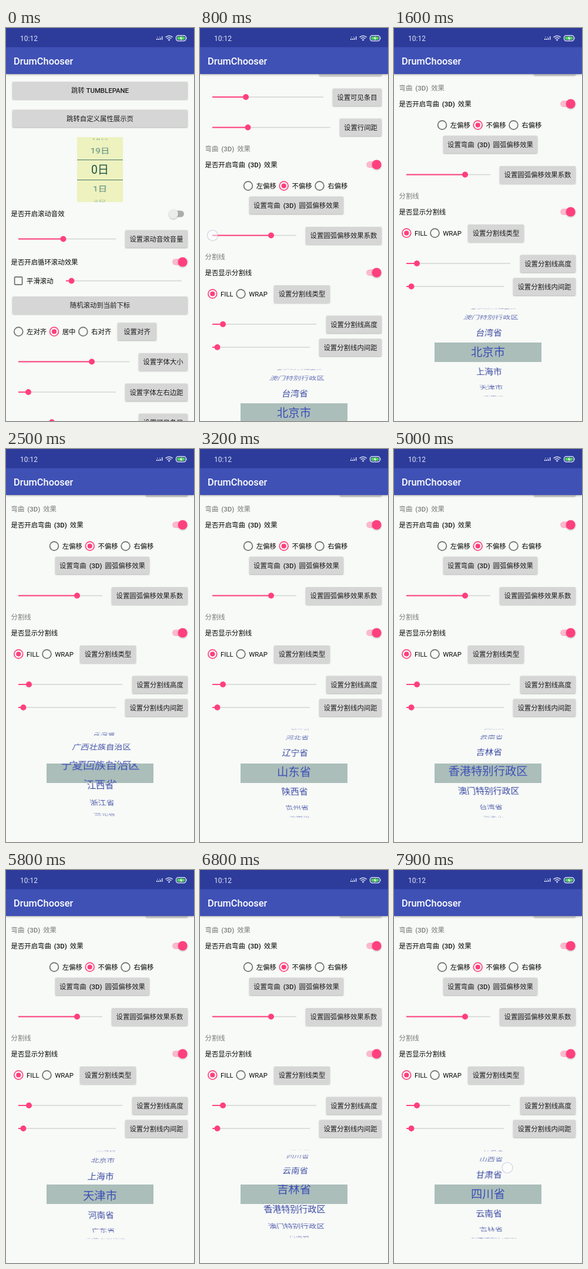
These frames come from a looping animation (320 px wide and 666 px high, 8 s). An HTML page:

```html
<!DOCTYPE html>
<html lang="zh-CN">
<head>
<meta charset="utf-8">
<title>DrumChooser</title>
<style>
html, body { margin: 0; width: 100%; height: 100%; overflow: hidden; }
body { font-family: Roboto, "Noto Sans CJK SC", "Noto Sans CJK", sans-serif; background: #f8faf7; }
#stage { position: relative; width: 320px; height: 666px; overflow: hidden; background: #f8faf7; }
#page { position: absolute; left: 0; top: 0; width: 320px; height: 1320px; }
#page svg { position: absolute; left: 0; top: 0; }
#bar { position: absolute; left: 0; top: 0; width: 320px; height: 78px; background: #3f51b5;
  box-shadow: 0 1px 3px rgba(0,0,0,.35); }
#bar svg { position: absolute; left: 0; top: 0; }
#touch { position: absolute; left: -9.5px; top: -9.5px; width: 17px; height: 17px; border-radius: 50%;
  border: 1px solid rgba(150,160,200,.5); background: rgba(255,255,255,.45); }
.wheel, .layer { position: absolute; }
.layer { left: 0; top: 0; width: 100%; height: 100%; }
.item { position: absolute; left: 0; width: 100%; height: 30px; line-height: 30px;
  text-align: center; white-space: nowrap; }
</style>
</head>
<body>
<div id="stage">
  <div id="page"></div>
  <div id="bar">
    <svg width="320" height="78" font-family="inherit" fill="#fff">
      <rect width="320" height="32.5" fill="#2d3c9b"/>
      <text x="24" y="22" font-size="12" fill="#dfe3f5">10:12</text>
      <text x="13" y="62.3" font-size="16.4" font-weight="500">DrumChooser</text>
      <g fill="#dfe3f5">
        <path d="M256 18h2v2h-2zM259 18h2v2h-2zM262 17h1.6v3H262zM265 14h1.4v6H265zM257 15h1.4v1H257zM261 15h1.4v1H261z"/>
        <path d="M271.6 15.6q6-4.8 12 0M273.8 18q3.8-3 7.6 0" fill="none" stroke="#dfe3f5" stroke-width="1.5"/>
        <path d="M275.6 19.8q2-1.6 4 0l-2 2.2z"/>
      </g>
      <rect x="289.5" y="12.6" width="16.8" height="9.2" rx="3.8" fill="none" stroke="#eef1fa" stroke-width="1.3"/>
      <rect x="291.2" y="14.4" width="13.2" height="5.6" rx="2" fill="#4fce5d"/>
      <path d="M307.5 15.2q1.6 2 0 4z" fill="#eef1fa"/>
      <path d="M298.8 13.6l-3 4.4h2.2l-.8 3.4 3.2-4.5h-2.3z"/>
    </svg>
  </div>
  <div id="touch"></div>
</div>
<script>
const PINK = '#ff3f7f', GREY = '#6e6e6e', INK = '#080808', SOFT = '#7b7b7b', RAIL = '#d2d4d2';
const page = document.getElementById('page');
const touch = document.getElementById('touch');

// Static widgets, each placed by its vertical centre
const label = (x, y, s, fill = INK, extra = '') =>
  `<text x="${x}" y="${y + 4.3}" fill="${fill}" ${extra}>${s}</text>`;

const button = (x1, x2, y, s) =>
  `<rect x="${x1}" y="${y - 15}" width="${x2 - x1}" height="29.6" rx="1.6" fill="#d5d6d5" filter="url(#drop)"/>` +
  label((x1 + x2) / 2, y, s, '#1c1c1c', 'text-anchor="middle"');

const slider = (x1, x2, thumb, y) =>
  `<path d="M${x1} ${y}H${x2}" stroke="${RAIL}" stroke-width="1.7"/>` +
  `<path d="M${x1} ${y}H${thumb}" stroke="${PINK}" stroke-width="1.9"/>` +
  `<circle cx="${thumb}" cy="${y}" r="5" fill="${PINK}"/>`;

const toggle = (y, on) =>
  `<rect x="283" y="${y - 5.6}" width="20" height="11.2" rx="5.6" fill="${on ? '#fbb9cf' : '#adaeac'}"/>` +
  `<circle cx="${on ? 300.7 : 285}" cy="${y}" r="8" fill="${on ? PINK : '#ececec'}" filter="url(#drop)"/>`;

const radio = (x, y, s, on) =>
  `<circle cx="${x}" cy="${y}" r="7.4" fill="none" stroke="${on ? PINK : GREY}" stroke-width="1.7"/>` +
  (on ? `<circle cx="${x}" cy="${y}" r="4.1" fill="${PINK}"/>` : '') + label(x + 13.7, y, s);

const bold = s => `<tspan font-weight="500">${s}</tspan>`;
const cube = rest => `<tspan dx="5" font-weight="500">(3D)</tspan><tspan dx="5">${rest}</tspan>`;

page.innerHTML = `<svg width="320" height="1320" font-family="inherit" font-size="11.4">
<defs><filter id="drop" x="-20%" y="-20%" width="140%" height="160%">
<feDropShadow dx="0" dy="1" stdDeviation=".8" flood-opacity=".3"/></filter></defs>` + [
  button(11, 309, 106, '跳转 ' + bold('TUMBLEPANE')),
  button(11, 309, 153.5, '跳转自定义属性展示页'),
  label(8.5, 315, '是否开启滚动音效'), toggle(315, false),
  slider(21, 187, 97.5, 357.5), button(203, 309, 357.5, '设置滚动音效音量'),
  label(8.5, 397, '是否开启循环滚动效果'), toggle(396.5, true),
  `<rect x="14.6" y="421.8" width="13" height="13" rx="1" fill="none" stroke="${GREY}" stroke-width="1.7"/>`,
  label(35, 428.5, '平滑滚动'), slider(102, 299, 111.5, 428.5),
  button(11, 309, 470, '随机滚动到当前下标'),
  radio(21.3, 514.5, '左对齐'), radio(82, 514.5, '居中', true), radio(131.3, 514.5, '右对齐'),
  button(190, 256, 514.5, '设置对齐'),
  slider(21, 210, 146, 565.5), button(226, 309, 566, '设置字体大小'),
  slider(21, 187, 38, 617), button(203, 309, 617.5, '设置字体左右边距'),
  slider(21, 210, 78, 668), button(226, 309, 668.5, '设置可见条目'),
  slider(21, 222, 81.5, 719.5), button(238, 309, 719.5, '设置行间距'),
  label(8.5, 756, '弯曲' + cube('效果'), SOFT),
  label(8.5, 783, '是否开启弯曲' + cube('效果')), toggle(782.5, true),
  radio(82, 818.5, '左偏移'), radio(142.7, 818.5, '不偏移', true), radio(203.5, 818.5, '右偏移'),
  button(84, 244, 851.5, '设置弯曲' + cube('圆弧偏移效果')),
  slider(21, 164, 121, 902.5), button(180, 309, 903, '设置圆弧偏移效果系数'),
  label(8.5, 939, '分割线', SOFT),
  label(8.5, 966, '是否显示分割线'), toggle(965.5, true),
  radio(21.3, 1001.5, 'FILL', true), radio(69.5, 1001.5, 'WRAP'),
  button(126, 221, 1002, '设置分割线类型'),
  slider(21, 198, 39, 1053), button(215, 309, 1053.5, '设置分割线高度'),
  slider(21, 187, 29.5, 1092), button(203, 309, 1092.5, '设置分割线内间距')
].join('') + '</svg>';

// A drum of rows; the band shows large text, the rest small text
function makeWheel(o) {
  const R = o.radius, step = Math.PI / o.rows, half = o.gap / 2;
  const box = document.createElement('div');
  box.className = 'wheel';
  box.style.cssText = `left:${o.x}px;top:${o.y - R}px;width:${o.w}px;height:${2 * R}px;background:${o.back}`;
  box.innerHTML = `<div style="position:absolute;left:0;width:100%;top:${R - half}px;height:${o.gap}px;` +
    `box-sizing:border-box;${o.band}"></div>`;
  const a = R - half + 'px', b = R + half + 'px';
  const clips = [
    `inset(${a} 0 ${a} 0)`,
    `polygon(evenodd, 0 0, 100% 0, 100% 100%, 0 100%, 0 0, 0 ${a}, 100% ${a}, 100% ${b}, 0 ${b}, 0 ${a})`
  ];
  const layers = clips.map((clip, i) => {
    const layer = document.createElement('div');
    layer.className = 'layer';
    layer.style.cssText = `clip-path:${clip};color:${o.inks[i]};font-size:${o.sizes[i]}px`;
    box.append(layer);
    return Array.from({ length: 9 }, () => {
      const el = document.createElement('div');
      el.className = 'item';
      el.style.top = R - 14.2 + 'px';
      el.style.transformOrigin = o.eye + 'px 50%';
      layer.append(el);
      return el;
    });
  });
  page.append(box);
  return pos => {
    const mid = Math.round(pos), n = o.names.length;
    for (let k = 0; k < 9; k++) {
      const row = mid + k - 4, ang = (row - pos) * step;
      const shown = Math.abs(ang) < Math.PI / 2 - .02;
      const move = `translateY(${R * Math.sin(ang)}px) perspective(171px) ` +
        `translateZ(${-R * (1 - Math.cos(ang))}px) rotateX(${-ang}rad)`;
      for (const layer of layers) {
        const el = layer[k];
        el.style.display = shown ? '' : 'none';
        el.style.opacity = Math.min(1, .2 + .9 * Math.cos(ang));
        el.textContent = o.names[((row % n) + n) % n];
        el.style.transform = move;
      }
    }
  };
}

const dayWheel = makeWheel({
  x: 121, y: 240, w: 78, radius: 55, rows: 5, gap: 35, eye: 39,
  names: Array.from({ length: 20 }, (_, i) => i + '日'),
  back: '#edf2bf', band: 'border:solid #4b7468;border-width:1px 0',
  inks: ['#1d5348', '#457f76'], sizes: [19.3, 16.4]
});

const regionWheel = makeWheel({
  x: 69, y: 1203.5, w: 182, radius: 76, rows: 7, gap: 33, eye: 129,
  names: ('北京市 上海市 天津市 河南省 广东省 内蒙古自治区 黑龙江省 湖北省 青海省 广西壮族自治区 ' +
    '宁夏回族自治区 江西省 浙江省 河北省 辽宁省 山东省 陕西省 贵州省 重庆市 西藏自治区 安徽省 福建省 ' +
    '新疆维吾尔自治区 湖南省 海南省 江苏省 山西省 甘肃省 四川省 云南省 吉林省 ' +
    '香港特别行政区 澳门特别行政区 台湾省').split(' '),
  back: 'none', band: 'background:#abbeba',
  inks: ['#3a4db6', '#3343a0'], sizes: [19.3, 15.4]
});

// Moves: start ms, end ms, from, to, ease-out power
const scrolls = [[50, 790, 0, 551, 1.5], [840, 1400, 551, 654, 2]];
const spins = [[1800, 3850, 0, 15.92, 2.53], [3950, 5900, 15.92, 36, 1.82], [6000, 7700, 36, 28, 2]];
// Touches: start ms, end ms, x, y from, y to
const touches = [
  [770, 840, 21, 351, 351], [840, 1000, 21, 351, 290], [1720, 1880, 195, 585, 500],
  [3870, 3950, 195, 581, 581], [3950, 4050, 195, 581, 500],
  [5920, 6080, 193, 504, 580], [7880, 8000, 192.5, 504, 504]
];

function track(moves, t) {
  let v = moves[0][2];
  for (const [t0, t1, from, to, pow] of moves) {
    if (t < t0) break;
    const x = Math.min(1, (t - t0) / (t1 - t0));
    v = from + (to - from) * (1 - Math.pow(1 - x, pow));
  }
  return v;
}

function draw(t) {
  page.style.transform = `translateY(${-track(scrolls, t)}px)`;
  regionWheel(track(spins, t));
  const tap = touches.find(([t0, t1]) => t >= t0 && t < t1);
  touch.style.display = tap ? '' : 'none';
  if (tap) {
    const [t0, t1, x, y0, y1] = tap;
    touch.style.transform = `translate(${x}px, ${y0 + (y1 - y0) * (t - t0) / (t1 - t0)}px)`;
  }
}

dayWheel(0);
draw(0);
const begin = performance.now();
function tick() {
  draw((performance.now() - begin) % 8000);
  requestAnimationFrame(tick);
}
requestAnimationFrame(tick);
</script>
</body>
</html>
```
